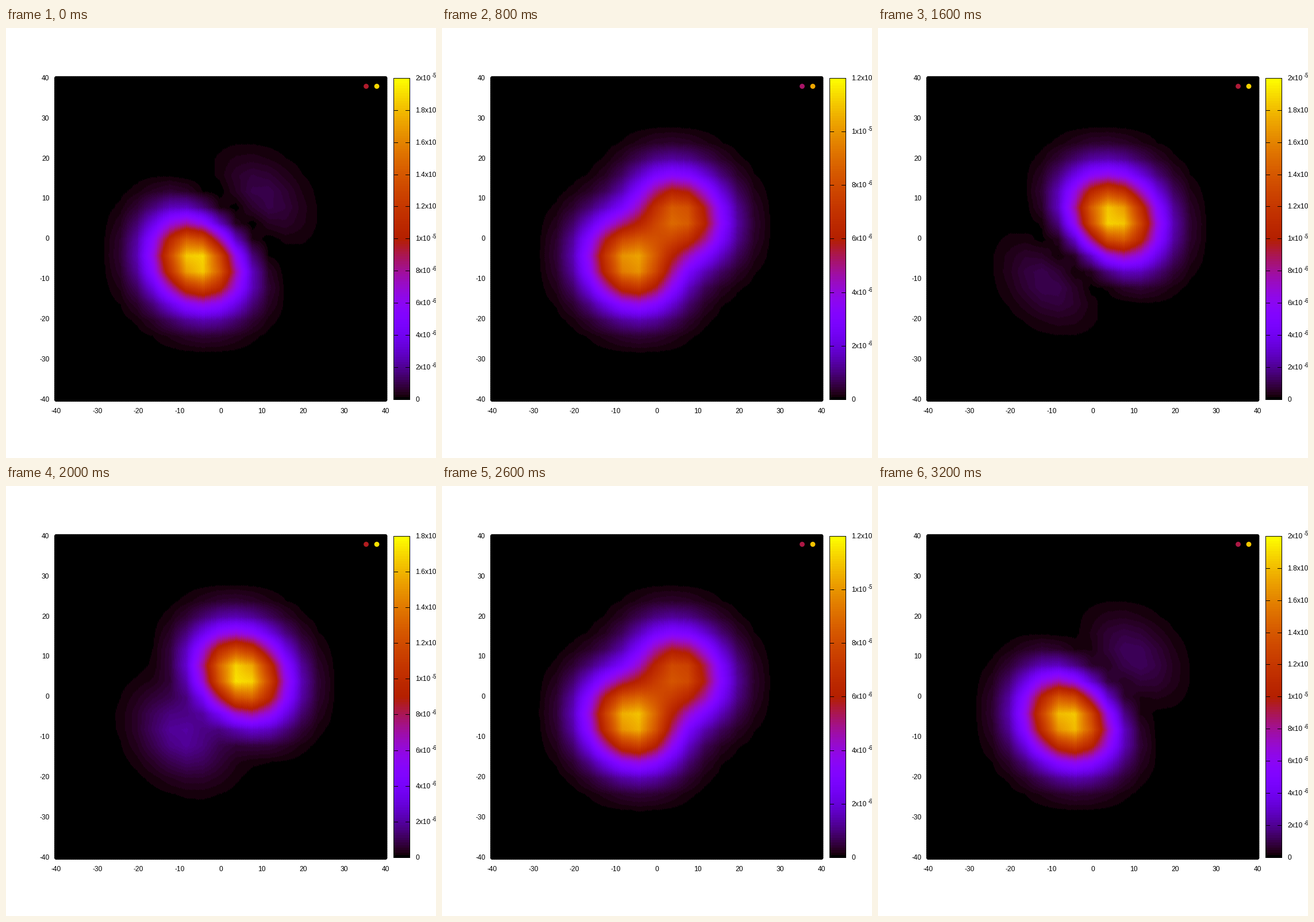
These frames come from a looping animation (748 px wide and 748 px high, 3400 ms). A matplotlib script:

```python
import numpy as np
import matplotlib.pyplot as plt
from matplotlib.animation import FuncAnimation
from matplotlib.patches import Circle

SIZE, DPI = 748, 100
FRAMES, INTERVAL = 17, 200
LEFT, RIGHT, TOP, BOTTOM = 87.4, 660.0, 87.2, 646.6
BAR_LEFT, BAR_RIGHT = 674, 703
LEVELS = 128
DOT_RADIUS = 3.4
WIDTH = 7.7                      # spread of the oscillator ground state
PEAK = 1.88e-5                   # highest density of the whole run
PHASE_STEP = np.radians(21.4)    # phase advance per frame
CB_STEP = 2e-6
PT = 72 / DPI                    # one pixel in points

plt.rcParams["font.family"] = "Liberation Sans"

# Palette: red = sqrt(x), green = x^3, blue = sin(2 pi x)
shade = np.linspace(0, 1, LEVELS)
palette = np.stack([np.sqrt(shade), shade**3,
                    np.clip(np.sin(2 * np.pi * shade), 0, 1)], axis=1)


def colour(fraction):
    level = np.floor(np.asarray(fraction) * LEVELS).astype(int)
    return palette[np.clip(level, 0, LEVELS - 1)]


# Coarse samples, refined bilinearly onto a lattice of dots
nodes = np.linspace(-40, 40, 21)
fine = np.linspace(-40, 40, 401)
hat = np.maximum(0, 1 - np.abs(fine[:, None] - nodes) / 4)
gx, gy = np.meshgrid(nodes, nodes, indexing="ij")
along = (gx + gy) / np.sqrt(2) / WIDTH
envelope = np.exp(-(gx**2 + gy**2) / (2 * WIDTH**2))
scale = PEAK / ((1 - along)**2 * envelope).max()


def density(phase):
    """|ground + exp(i phase) * first excited|^2 on the dot lattice."""
    coarse = scale * envelope * (1 + along**2 - 2 * along * np.cos(phase))
    return hat @ coarse @ hat.T


def to_px(x):
    return LEFT + (x + 40) / 80 * (RIGHT - LEFT)


def to_py(y):
    return BOTTOM - (y + 40) / 80 * (BOTTOM - TOP)


def paint_dots():
    """Per pixel: last dot painted over it (-1: none) and nearest dot's distance."""
    cx, cy = (a.ravel() for a in
              np.meshgrid(to_px(fine), to_py(fine), indexing="ij"))
    order = np.arange(cx.size)
    cover = np.full((SIZE, SIZE), -1)
    nearest = np.full((SIZE, SIZE), np.inf)
    for dx in range(-4, 5):
        for dy in range(-4, 5):
            px = np.floor(cx).astype(int) + dx
            py = np.floor(cy).astype(int) + dy
            distance = np.hypot(px + 0.5 - cx, py + 0.5 - cy)
            inside = distance <= DOT_RADIUS
            np.maximum.at(cover, (py[inside], px[inside]), order[inside])
            np.minimum.at(nearest, (py, px), distance)
    return cover, nearest


cover, nearest = paint_dots()
painted = cover >= 0
owner = cover[painted]

# White shows through where the outermost dots only partly cover a pixel.
paper = np.clip(nearest - DOT_RADIUS + 0.5, 0, 1)
stage = np.repeat(paper[:, :, None], 3, axis=2)
rows = np.arange(int(TOP), int(BOTTOM) + 1)
stage[rows, BAR_LEFT:BAR_RIGHT] = colour(
    (BOTTOM - rows - 0.5) / (BOTTOM - TOP))[:, None]

fig = plt.figure(figsize=(SIZE / DPI, SIZE / DPI), dpi=DPI, facecolor="white")
ax = fig.add_axes([0, 0, 1, 1])
ax.axis("off")
picture = ax.imshow(stage, extent=(0, SIZE, SIZE, 0), interpolation="nearest",
                    aspect="auto")
ax.set(xlim=(0, SIZE), ylim=(SIZE, 0))


def label(x, y, text, ha="left", size=12):
    return ax.text(x, y, text, ha=ha, va="baseline", fontsize=size * PT,
                   color="black")


def hairline(xs, ys):
    return ax.plot(xs, ys, color="black", lw=PT, snap=False,
                   solid_capstyle="butt", solid_joinstyle="miter")[0]


def pixel_centre(y):
    return np.floor(y) + 0.5


for value in range(-40, 41, 10):
    label(to_px(value), 670, str(value), "center")
    label(75.5, to_py(value) + 3.5, str(value), "right")

x0, x1 = BAR_LEFT + 0.5, BAR_RIGHT - 0.5
y0, y1 = pixel_centre(TOP), pixel_centre(BOTTOM)
hairline([x0, x1, x1, x0, x0, x1], [y0, y0, y1, y1, y0, y0])
label(712.5, BOTTOM + 3.5, "0")

key_dots = [ax.add_patch(Circle((x, 101.4), 4.4, lw=0)) for x in (626.5, 645)]


def make_tick(k):
    marks = [hairline([x, x + 8], [0, 0]) for x in (BAR_LEFT, BAR_RIGHT - 8)]
    mantissa, power = (2 * k, "-6") if k < 5 else (k / 5, "-5")
    base = label(712.5, 0, f"{mantissa:g}x10")
    # After a decimal mantissa the exponent falls beyond the stage edge.
    exponent = label(741 if mantissa == int(mantissa) else 751, 0, power,
                     size=9.6)
    return marks, base, exponent


ticks = {k: make_tick(k) for k in range(1, 11)}


def update(frame):
    field = density(frame * PHASE_STEP).ravel()
    count = int(np.ceil(field.max() / CB_STEP))
    fraction = field / (count * CB_STEP)

    stage[painted] = np.minimum(
        colour(fraction)[owner] + paper[painted][:, None], 1)
    picture.set_data(stage)
    for dot, share in zip(key_dots, (0.5, 1)):
        dot.set_facecolor(colour(share * fraction.max()))

    for k, (marks, base, exponent) in ticks.items():
        y = BOTTOM - (BOTTOM - TOP) * k / count
        for mark in marks:
            mark.set_ydata([pixel_centre(y)] * 2)
        base.set_y(y + 3.5)
        exponent.set_y(y - 1)
        for artist in (*marks, base, exponent):
            artist.set_visible(k <= count)
    return [picture]


anim = FuncAnimation(fig, update, frames=FRAMES, interval=INTERVAL,
                     repeat=True, repeat_delay=0, blit=False)
plt.show()
```
